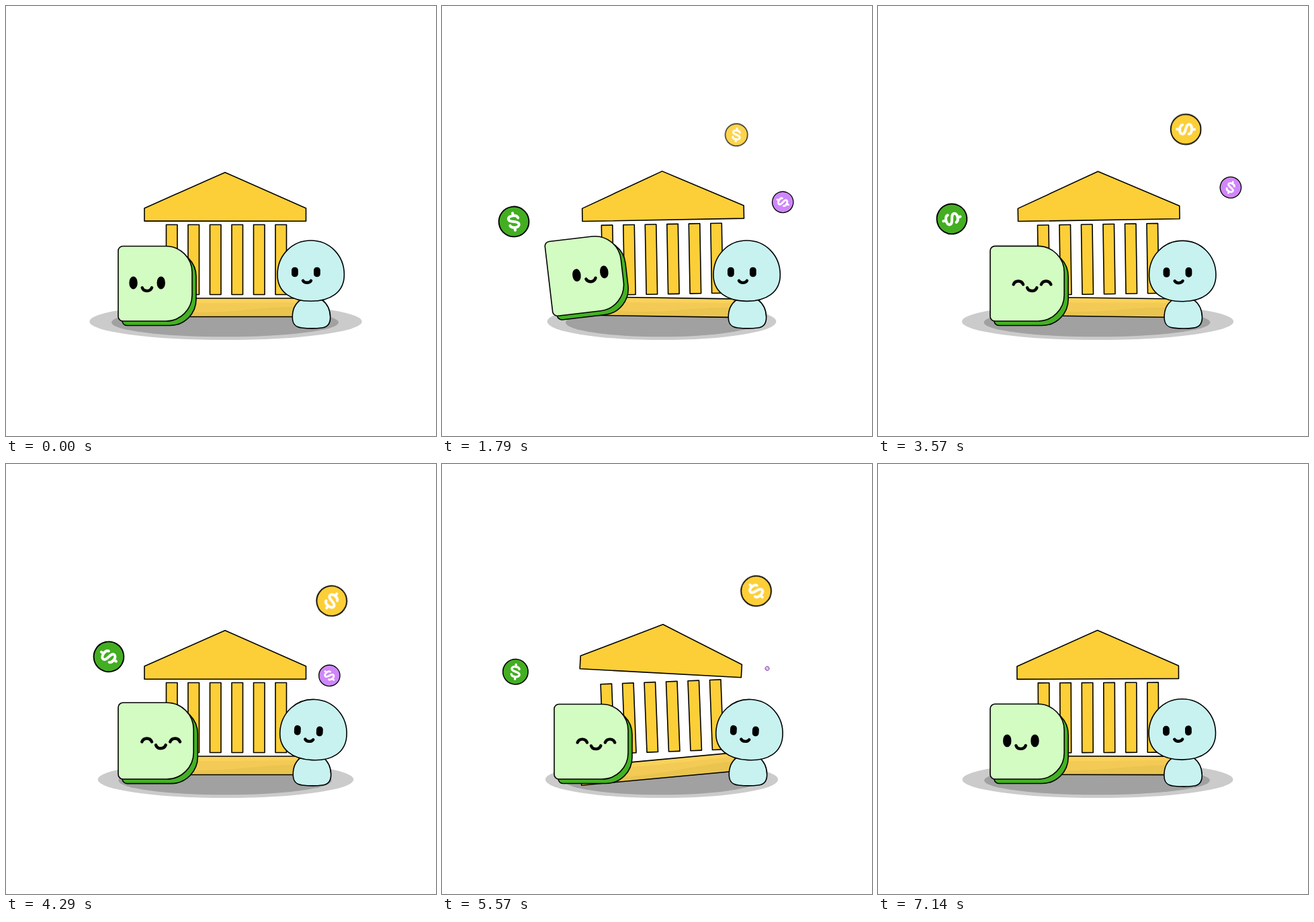
Animation, 640 px wide and 640 px high, one loop 7.21 s. Source, as an HTML page:

```html
<!DOCTYPE html>
<html lang="en">
<head>
<meta charset="utf-8">
<title>Bank friends</title>
<style>
html, body { margin: 0; width: 100%; height: 100%; overflow: hidden; background: #fff; }
svg { display: block; width: 100vw; height: 100vh; }
.ink { stroke: #000; stroke-width: 1.6; stroke-linejoin: round; }
.gold { fill: #fccf38; }
.line { fill: none; stroke: #000; stroke-width: 4.4; stroke-linecap: round; }

.move { animation: 7210ms linear infinite; }
.soft { animation-timing-function: ease-in-out; }

#shadow { animation-name: shadow; transform-origin: 327px 470px; }
@keyframes shadow {
  0%, 50%, 100% { scale: 1 1; }
  25%, 75% { scale: .84 1; }
}

/* The bank hops apart once per quarter loop, leaning slightly beforehand. */
#roof { animation-name: roof; transform-origin: 326px 320px; }
@keyframes roof {
  0%, 8%, 20%, 33%, 48%, 58%, 73%, 83%, 98.6%, 100% { translate: 0 0; rotate: 0deg; }
  2.3%, 27.3%, 52.3%, 77.25% { translate: -1px -9px; rotate: 3.1deg; }
  14.84% { translate: 1.3px 0; rotate: -.48deg; }
  24.83%, 49.8%, 74.8% { translate: 3px -1.8px; rotate: -1.07deg; }
  99.03% { translate: 1px -.3px; rotate: -.25deg; }
}
#columns { animation-name: columns; transform-origin: 328px 377.5px; }
@keyframes columns {
  0%, 8%, 20%, 33%, 48%, 58%, 73%, 83%, 98.6%, 100% { translate: 0 0; rotate: 0deg; }
  2.3%, 27.3%, 52.3%, 77.25% { translate: -.5px -1.2px; rotate: -2.2deg; }
  14.84% { translate: -.2px 2.8px; rotate: -.4deg; }
  24.83%, 49.8%, 74.8% { translate: -.3px -.7px; rotate: -1deg; }
  99.03% { translate: 0 0; rotate: -.25deg; }
}
#base { animation-name: base; transform-origin: 326px 449px; }
@keyframes base {
  0%, 8%, 20%, 33%, 48%, 58%, 73%, 83%, 98.6%, 100% { translate: 0 0; rotate: 0deg; }
  2.3%, 27.3%, 52.3%, 77.25% { translate: 0 4.8px; rotate: -5.3deg; }
  14.84% { translate: 0 -.7px; rotate: .3deg; }
  24.83%, 49.8%, 74.8% { translate: 0 -.7px; rotate: .9deg; }
  99.03% { translate: 0 -.1px; rotate: .1deg; }
}

#green { animation-name: green; transform-origin: 167px 469px; }
@keyframes green {
  0%, 50%, 77.25%, 100% { translate: 0 0; rotate: 0deg; scale: 1; }
  14.84% { translate: 0 0; rotate: 0deg; scale: 1.01; }
  20% { translate: 0 0; rotate: 0deg; scale: 1; }
  24.83% { translate: -1.5px -7px; rotate: -6.7deg; scale: 1; }
  30% { translate: 0 0; rotate: 0deg; scale: 1; }
  39.67% { translate: 0 0; rotate: 0deg; scale: 1.032; }
  59.5% { translate: 0 0; rotate: 0deg; scale: 1.02; }
  88% { translate: 0 0; rotate: 0deg; scale: 1.02; }
}
#greenFace { animation-name: glance; }
@keyframes glance {
  0%, 100% { translate: 0 0; }
  7%, 93.2% { translate: 19.3px .2px; }
}
#greenFace .eye { animation-name: blink; stroke: #000; stroke-width: 4.4; stroke-linejoin: round; }
@keyframes blink {
  0%, 38.4%, 93%, 100% { d: path("M-4 0C-4 -9.6 4 -9.6 4 0C4 9.6 -4 9.6 -4 0Z"); }
  39.67% { d: path("M-6.2 2C-6 -8 6 -8 6.2 2C4 -.5 -4 -.5 -6.2 2Z"); }
  40.6%, 92% { d: path("M-7.2 2.4C-4.6 -4.2 4.6 -4.2 7.2 2.4C4.6 -4.2 -4.6 -4.2 -7.2 2.4Z"); }
}

#head, #body { animation-duration: 1802.5ms; }
#head { animation-name: head; transform-origin: 453.5px 465px; }
@keyframes head {
  0%, 50%, 100% { translate: 0 0; rotate: 0deg; }
  9%, 38% { translate: .3px 1.3px; rotate: 3px; rotate: 3deg; }
  24% { translate: .4px 1.5px; rotate: 3.6deg; }
  59.4%, 85% { translate: 0 3.1px; rotate: -3.2deg; }
  72% { translate: 0 3.4px; rotate: -3.8deg; }
  96.2% { translate: 0 .8px; rotate: -.8deg; }
}
#body { animation-name: body; }
@keyframes body {
  0%, 50%, 100% { translate: 0 0; }
  9%, 38% { translate: 1px -1px; }
  59.4%, 85% { translate: -1px 1px; }
  96.2% { translate: -.4px .2px; }
}

#coinPurple { animation-name: coinPurple; color: #cf87fb; }
@keyframes coinPurple {
  0%, 2% { translate: 500px 300px; rotate: -140deg; scale: 0; }
  6% { scale: .7; }
  9.6% { translate: 525px 262px; rotate: -57deg; }
  14.84% { translate: 492.3px 295px; rotate: -3deg; }
  19.5% { translate: 481px 315px; rotate: 55deg; }
  24.83% { translate: 507.2px 292px; rotate: 115deg; }
  29.5% { translate: 525px 270px; rotate: 168deg; }
  39.67% { translate: 481.5px 314.7px; rotate: 272deg; }
  49.5% { translate: 525px 270px; rotate: 382deg; }
  59.5% { translate: 481.3px 315px; rotate: 495deg; }
  69.5% { translate: 525px 270px; rotate: 605deg; }
  73% { scale: .7; }
  77.25% { translate: 484px 304.3px; rotate: 690deg; scale: .15; }
  78%, 100% { translate: 484px 304px; rotate: 700deg; scale: 0; }
}
#coinGreen { animation-name: coinGreen; color: #43ae22; }
@keyframes coinGreen {
  0%, 12.6% { translate: 156px 278px; rotate: 0deg; scale: 0; }
  14.84% { translate: 147.8px 284.7px; rotate: 10deg; scale: .48; }
  20% { scale: 1; }
  21.8% { translate: 108px 318px; rotate: 120deg; }
  24.83% { translate: 107px 321px; rotate: 171deg; }
  27% { translate: 105.5px 320px; rotate: 215deg; }
  39.67% { translate: 156px 289.5px; rotate: 370deg; }
  48.5% { translate: 105.5px 320px; rotate: 430deg; }
  59.5% { translate: 153px 286.8px; rotate: 482deg; }
  73% { translate: 106px 315px; rotate: 655deg; }
  75.5% { scale: 1; }
  77.25% { translate: 109.3px 309.3px; rotate: 724deg; scale: .84; }
  83%, 100% { translate: 128px 296px; rotate: 800deg; scale: 0; }
}
#coinGold { animation-name: coinGold; color: #fccf38; }
@keyframes coinGold {
  0%, 20% { translate: 430px 194px; rotate: -70deg; scale: 0; opacity: .7; }
  24.83% { translate: 438.2px 191.8px; rotate: 5deg; scale: .74; opacity: .9; }
  27.5% { scale: 1; opacity: 1; }
  32% { translate: 458px 183.5px; rotate: 75deg; }
  39.67% { translate: 481.3px 192px; rotate: 148deg; }
  49.5% { translate: 458px 183.5px; rotate: 270deg; }
  59.5% { translate: 484.8px 203.8px; rotate: 395deg; }
  69% { translate: 460px 183.5px; rotate: 540deg; }
  77.25% { translate: 467.6px 189px; rotate: 675deg; }
  84% { scale: 1; opacity: 1; }
  92%, 100% { translate: 450px 205px; rotate: 800deg; scale: 0; opacity: .7; }
}
</style>
</head>
<body>
<svg viewBox="0 0 640 640">
  <defs>
    <g id="coin">
      <circle r="22.4" fill="currentColor" stroke="#000" stroke-width="1.9"/>
      <path d="M6.6 -5C5 -10 -7 -10.5 -7 -5C-7 1 7.4 -1.2 7.4 5C7.4 10.5 -6 10.3 -7 4.6M0 -9V-13M0 9V13"
            fill="none" stroke="#fff" stroke-width="4" stroke-linecap="round"/>
    </g>
    <path id="slab" d="M174 357.5H238A39 39 0 0 1 277 396.5V430A39 39 0 0 1 238 469H174A7 7 0 0 1 167 462V364.5A7 7 0 0 1 174 357.5Z"/>
  </defs>

  <g id="shadow" class="move">
    <ellipse cx="327" cy="469.7" rx="202.7" ry="27.3" fill="#cbcbcb"/>
    <ellipse cx="326" cy="471" rx="169" ry="21.3" fill="#a1a1a1"/>
  </g>

  <g id="base" class="move">
    <path fill="#fbd259" d="M206 435H446V462.500H206Z"/>
    <path fill="#f3ca55" d="M206 440Q290 443 340 442T446 441V462.500H206Z"/>
    <path fill="#e9c44f" d="M206 451Q280 460 350 453T446 449V462.500H206Z"/>
    <path class="ink" fill="none" d="M206 435H446V462.500H206Z"/>
  </g>
  <g id="columns" class="move ink gold">
    <rect x="238.500" y="325.500" width="16.500" height="104"/>
    <rect x="271" y="325.500" width="16.500" height="104"/>
    <rect x="303.500" y="325.500" width="16.500" height="104"/>
    <rect x="336" y="325.500" width="16.500" height="104"/>
    <rect x="368.500" y="325.500" width="16.500" height="104"/>
    <rect x="401" y="325.500" width="16.500" height="104"/>
  </g>
  <path id="roof" class="move ink gold" d="M326 247.700L446.500 301V320.200H206V301Z"/>

  <g id="green" class="move">
    <use href="#slab" x="6" y="6.500" class="ink" fill="#44b123"/>
    <use href="#slab" class="ink" fill="#d3fcc3"/>
    <g id="greenFace" class="move">
      <g transform="translate(189.500 412)"><path class="eye move" d="M-4 0C-4 -9.600 4 -9.600 4 0C4 9.600 -4 9.600 -4 0Z"/></g>
      <g transform="translate(230.700 412)"><path class="eye move" d="M-4 0C-4 -9.600 4 -9.600 4 0C4 9.600 -4 9.600 -4 0Z"/></g>
      <path class="line" d="M202.700 419.200C205 425.500 214.500 425.500 217 419.200"/>
    </g>
  </g>

  <path id="body" class="move soft ink" fill="#c7f2f0"
        d="M439 437C430 443 426 453 426.300 464C426.500 474 431 478 440 479C449 480 462 480 470 479C479 478 482.800 473 482.700 463C482.500 452 478 443 470 437Z"/>
  <g id="head" class="move soft">
    <path class="ink" fill="#c7f2f0"
          d="M404 400C404 371 426 349 453.700 349S503.400 371 503.400 400C503.400 426 483 439.300 453.700 439.300S404 426 404 400Z"/>
    <rect x="425" y="388.700" width="9.800" height="14.600" rx="4.600"/>
    <rect x="458" y="388.700" width="9.800" height="14.600" rx="4.600"/>
    <path class="line" stroke-width="4" d="M442 408.800C444.500 412.800 451.500 412.800 454 408.800"/>
  </g>

  <use id="coinGreen" class="move" href="#coin"/>
  <use id="coinPurple" class="move" href="#coin"/>
  <use id="coinGold" class="move" href="#coin"/>
</svg>
</body>
</html>
```
